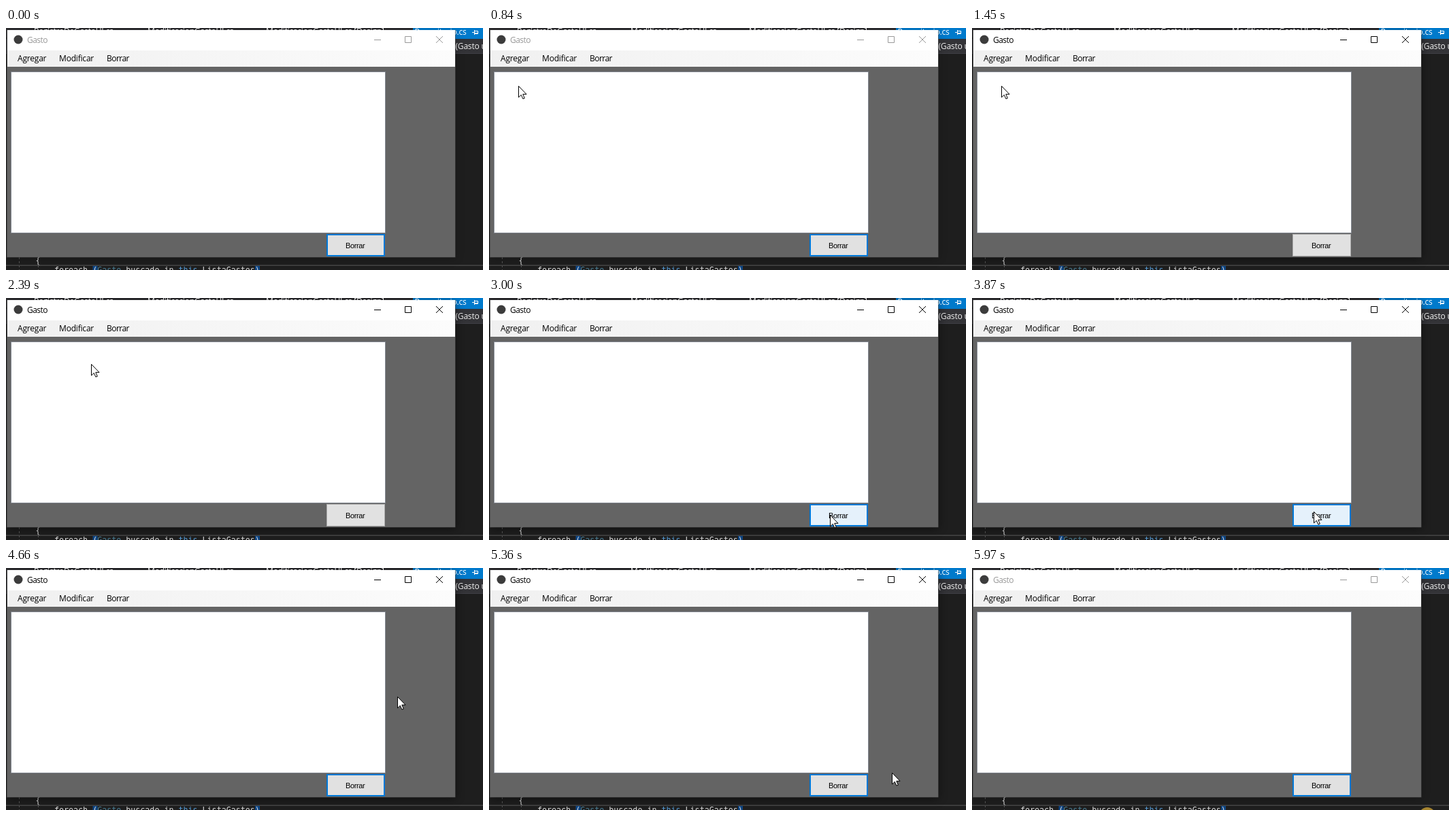
An HTML page that plays this animation: 701x356 px, repeating every 6.05 s.

```html
<!DOCTYPE html>
<html lang="es">
<head>
<meta charset="utf-8">
<title>Gasto</title>
<style>
html, body { margin: 0; width: 100%; height: 100%; overflow: hidden; background: #1e1e1e; }
svg { display: block; width: 701px; height: 356px; }
text { white-space: pre; }
.ui { font: 12px "Open Sans", sans-serif; letter-spacing: -.2px; }
.tight { letter-spacing: -.55px; }
.btn { font: 11px "Liberation Sans", sans-serif; letter-spacing: -.4px; }
.code { font: 11.66px "DejaVu Sans Mono", monospace; fill: #dcdcdc; }
</style>
</head>
<body>
<svg viewBox="0 0 701 356">
  <defs>
    <filter id="blur" x="-10%" y="-10%" width="120%" height="120%"><feGaussianBlur stdDeviation="7"/></filter>
    <linearGradient id="menu"><stop offset="0" stop-color="#f0f0f0"/><stop offset="1" stop-color="#fcfcfc"/></linearGradient>
  </defs>

  <!-- editor behind the window -->
  <rect width="701" height="356" fill="#1e1e1e"/>
  <rect width="701" height="14" fill="#2d2d30"/>
  <rect x="598" width="103" height="16" fill="#007acc"/>
  <path d="M685 6.5h3M688.5 3v7M689 4.5h4.5v4H689M689 7.5h4.5" fill="none" stroke="#fff"/>
  <rect y="16" width="701" height="21" fill="#333337"/>
  <rect y="37" width="701" height="1" fill="#3f3f46"/>
  <text class="ui" x="660.5" y="31" fill="#f1f1f1">(Gasto u</text>
  <path d="M19.5 337V356M47.5 349V356" stroke="#555" stroke-dasharray="3 3"/>
  <text class="code" x="43.5" y="346">{</text>
  <rect y="348.5" width="701" height="1.5" fill="#464646"/>
  <rect x="127.5" y="350" width="7" height="6" fill="#0e4583"/>
  <rect x="366" y="350" width="7" height="6" fill="#0e4583"/>
  <text class="code" x="71" y="360">foreach (<tspan fill="#4a7f96">Gasto</tspan> buscado in <tspan fill="#569cd6">this</tspan>.ListaGastos)</text>

  <rect id="shadow" x="2" y="6" width="658" height="333" filter="url(#blur)"/>
  <g class="ui" fill="#f1f1f1">
    <text x="41" y="9">RegistroDeGastoUI.cs</text>
    <text x="208" y="9">ModificacionGastoUI.cs</text>
    <text x="382" y="9">ModificacionGastoUI.cs [Design]</text>
    <text x="676.5" y="10" text-anchor="end" fill="#fff">Repositorio.cs</text>
  </g>

  <!-- window -->
  <rect x="1" y="3" width="659.5" height="334.5" fill="#4a4a4a"/>
  <rect x="2" y="3" width="658" height="334" fill="#646464"/>
  <rect x="2" y="3" width="658" height="30" fill="#fff"/>
  <rect x="2" y="33" width="658" height="24" fill="url(#menu)"/>
  <circle cx="18" cy="17" r="6.5" fill="#3c3c3c"/>
  <text id="title" class="ui tight" x="31" y="22">Gasto</text>
  <path id="controls" d="M541 17.5h10M586.5 12.5h9v9h-9zM632 12l10 10M642 12l-10 10" fill="none"/>
  <text class="ui" x="17" y="49">Agregar</text>
  <text class="ui" x="78" y="49">Modificar</text>
  <text class="ui tight" x="148" y="49">Borrar</text>
  <rect x="7.5" y="64.5" width="550" height="237" fill="#fff" stroke="#828790"/>
  <rect id="edge" x="471" y="303" width="86" height="33"/>
  <rect id="face"/>
  <text class="btn" x="499" y="324">Borrar</text>

  <circle id="ring" r="12" fill="#ffc83c"/>
  <path id="cursor" d="M.5 .5V17L4.3 13.4 6.9 19.2 9.3 18.2 6.8 12.4H12z" fill="#fff" stroke="#000" stroke-linejoin="round"/>
</svg>

<script>
const LOOP = 6050, TICK = 75, CLICK = 220;
const ENTER = 380, FOCUS = 990, PRESS = 3170, EXIT = 5740, BLUR = 5970;
const clicks = [FOCUS, PRESS, 3550, 4020, BLUR];

// each stroke runs at an even pace through its points
const strokes = [
  { from: ENTER, to: 840, via: [[518, 242], [250, 130], [100, 74], [43, 85]] },
  { from: 1610, to: 2160, via: [[43, 85], [121, 118], [42, 82]] },
  { from: 2240, to: 3000, via: [[50, 86], [126, 97], [250, 165], [390, 250], [478, 303], [501, 319]] },
  { from: 3400, to: 3550, via: [[501, 319], [502, 314]] },
  { from: 4190, to: 4650, via: [[502, 314], [406, 240], [634, 178], [575, 189]] },
  { from: 4650, to: 5360, via: [[575, 189], [460, 166], [301, 195], [420, 250], [592, 301]] },
  { from: 5430, to: EXIT, via: [[592, 301], [660, 360]] }
];

const $ = id => document.getElementById(id);
const set = (id, attrs) => {
  for (const k in attrs) $(id).setAttribute(k, attrs[k]);
};
const mix = (a, b, k) => a + (b - a) * k;

function pointer(t) {
  const { from, to, via } = strokes.filter(s => s.from <= t).pop() || strokes[0];
  const now = t >= to ? to : from + Math.floor(Math.max(0, t - from) / TICK) * TICK;
  const pos = (now - from) / (to - from) * (via.length - 1);
  const i = Math.min(Math.floor(pos), via.length - 2);
  return [0, 1].map(axis => Math.round(mix(via[i][axis], via[i + 1][axis], pos - i)));
}

function button(focused, hover, pressed) {
  const w = focused || hover ? 2 : 1;
  const edge = hover && pressed ? '#005499' : w > 1 ? '#0078d7' : '#adadad';
  const face = !hover ? '#e1e1e1' : pressed ? '#cce4f7' : '#e5f1fb';
  set('edge', { fill: edge });
  set('face', { x: 471 + w, y: 303 + w, width: 86 - 2 * w, height: 33 - 2 * w, fill: face });
}

function draw(t) {
  const shown = t >= ENTER && t < EXIT;
  const active = t >= FOCUS && t < BLUR;
  const clicked = clicks.some(c => t >= c && t < c + CLICK);
  const [x, y] = pointer(t);
  const hover = shown && x >= 471 && x < 557 && y >= 303 && y < 336;
  const ink = active ? '#000' : '#999';

  set('title', { fill: ink });
  set('controls', { stroke: ink });
  set('shadow', { opacity: active ? .5 : .25 });
  button(t < FOCUS || t >= PRESS, hover, clicked);
  set('cursor', { transform: `translate(${x} ${y})`, opacity: +shown });
  set('ring', { cx: shown ? x : 669, cy: shown ? y : 364, opacity: clicked ? .6 : 0 });
}

function frame() {
  draw(performance.now() % LOOP);
  requestAnimationFrame(frame);
}
frame();
</script>
</body>
</html>
```
